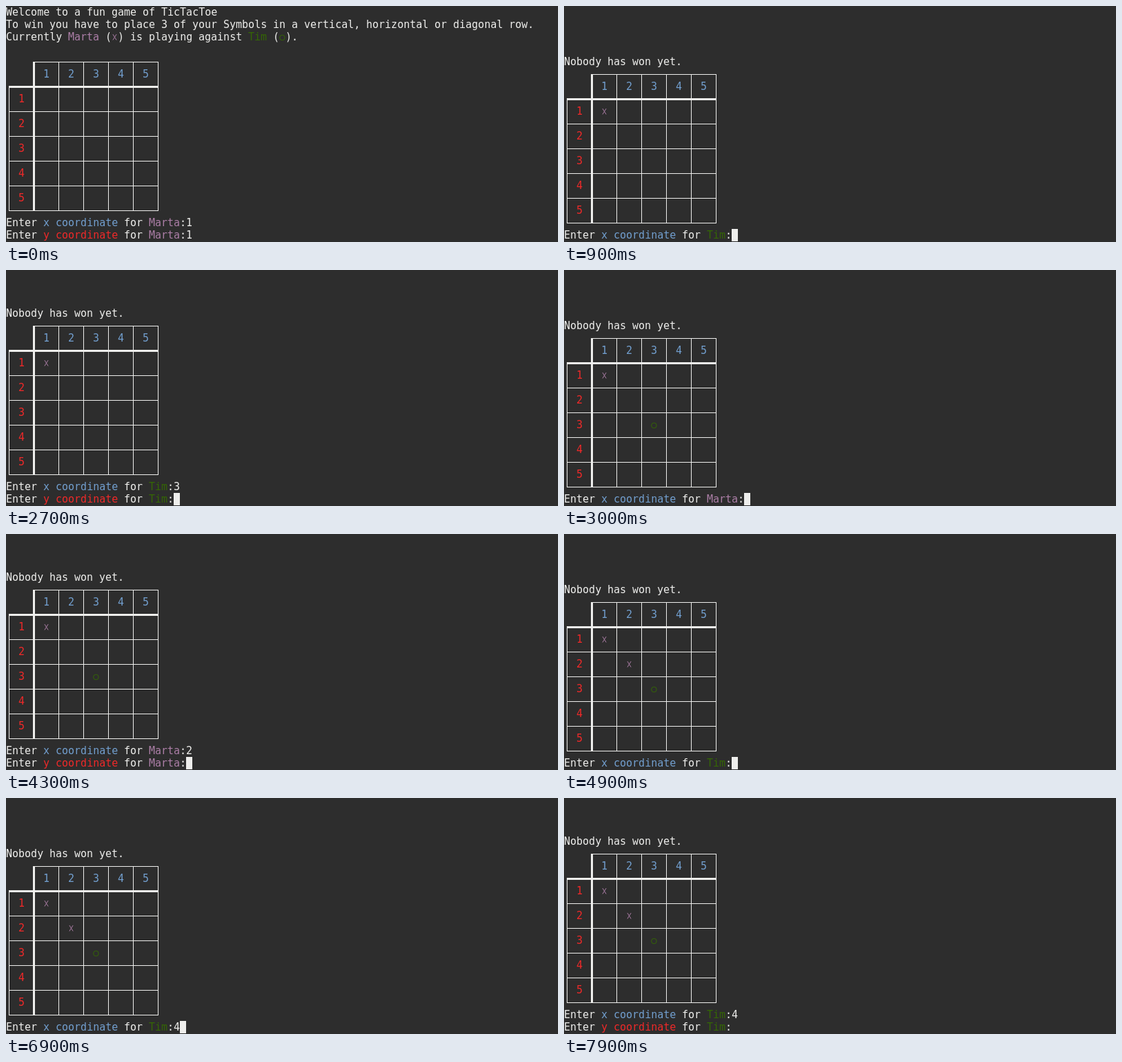
Recreate the animation shown at these times as an HTML page. Size 800x343 px, loop 8 s.

```html
<!DOCTYPE html>
<html lang="en">
<head>
<meta charset="utf-8">
<title>TicTacToe in a terminal</title>
<style>
  html, body { margin: 0; width: 100%; height: 100%; overflow: hidden; background: #2d2d2d; }
  svg { display: block; width: 100%; height: 100%; }
  text { font: 15px "DejaVu Sans Mono", monospace; white-space: pre; }
</style>
</head>
<body>
<svg id="screen" viewBox="0 0 800 343"></svg>
<script>
const CELL = 9, LINE = 18, LOOP = 8000;
const WHITE = '#eeeeec', BLUE = '#729fcf', RED = '#ef2929', PURPLE = '#ad7fa8', GREEN = '#346604';
const cross = { name: 'Marta', color: PURPLE, draw: drawCross };
const ring = { name: 'Tim', color: GREEN, draw: drawRing };
const screen = document.getElementById('screen');

// Moves on the board: player, column, row
const moves = [[cross, 1, 1], [ring, 3, 3], [cross, 2, 2]];

// Start time, moves made, player, typed x, typed y (null = not asked yet), cursor visible
const steps = [
  [0, 0, cross, '1', '1', false],
  [400, 0, cross, '1', '1', true],
  [900, 1, ring, '', null, true],
  [1500, 1, ring, '', null, false],
  [2100, 1, ring, '', null, true],
  [2200, 1, ring, '3', null, true],
  [2700, 1, ring, '3', '', true],
  [2800, 1, ring, '3', '3', true],
  [3000, 2, cross, '', null, true],
  [3600, 2, cross, '', null, false],
  [4000, 2, cross, '2', null, true],
  [4300, 2, cross, '2', '', true],
  [4800, 2, cross, '2', '2', true],
  [4900, 3, ring, '', null, true],
  [5500, 3, ring, '', null, false],
  [6100, 3, ring, '', null, true],
  [6700, 3, ring, '', null, false],
  [6900, 3, ring, '4', null, true],
  [7300, 3, ring, '4', '', true],
  [7900, 3, ring, '4', '', false]
];

function rect(x, y, w, h) {
  return `<rect x="${x}" y="${y}" width="${w}" height="${h}" fill="${WHITE}"/>`;
}

// Every word starts on its own terminal column
function write(col, row, str, color = WHITE) {
  const words = [...str.matchAll(/\S+/g)];
  return words.map(w =>
    `<text x="${(col + w.index) * CELL}" y="${row * LINE + 14}" fill="${color}">${w[0]}</text>`).join('');
}

function writeParts(row, parts) {
  let col = 0, out = '';
  for (const [str, color] of parts) {
    out += write(col, row, str, color);
    col += str.length;
  }
  return out;
}

function drawCross(col, row) {
  const x = col * CELL + 4.5, y = row * LINE + 9.3;
  return `<path d="M${x - 2.6} ${y - 4.2}l5.2 8.4m0 -8.4l-5.2 8.4" stroke="${PURPLE}" fill="none"/>`;
}

function drawRing(col, row) {
  return `<circle cx="${col * CELL + 4.4}" cy="${row * LINE + 10}" r="3.8" stroke="${GREEN}" fill="none"/>`;
}

function drawBoard(row, count) {
  const top = row * LINE + 9;
  let out = rect(40, top, 181, 1) + rect(4, top + 36, 1, 181);
  out += rect(39, top, 3, 217) + rect(4, top + 35, 217, 3);
  for (let i = 1; i <= 5; i++) {
    out += rect(40 + i * 36, top, 1, 217) + rect(4, top + 36 + i * 36, 217, 1);
    out += write(2 + i * 4, row + 1, String(i), BLUE);
    out += write(2, row + 1 + i * 2, String(i), RED);
  }
  for (const [player, x, y] of moves.slice(0, count)) {
    out += player.draw(2 + x * 4, row + 1 + y * 2);
  }
  return out;
}

function drawIntro() {
  return write(0, 0, 'Welcome to a fun game of TicTacToe') +
    write(0, 1, 'To win you have to place 3 of your Symbols in a vertical, horizontal or diagonal row.') +
    writeParts(2, [
      ['Currently '], [cross.name, cross.color], [' ('], [' '], [') is playing against ']
    ]) +
    drawCross(12 + cross.name.length, 2) +
    write(33 + cross.name.length + 1, 2, ring.name, ring.color) +
    write(39 + ring.name.length + 1, 2, '(') +
    drawRing(44, 2) + write(45, 2, ').');
}

function prompt(row, axis, player, typed) {
  return writeParts(row, [
    ['Enter '], [axis + ' coordinate', axis === 'x' ? BLUE : RED],
    [' for '], [player.name, player.color], [':' + typed]
  ]);
}

function render([, count, player, x, y, cursor]) {
  const asksY = y !== null;
  const boardRow = asksY ? 4 : 5;
  let out = count ? write(0, boardRow - 1, 'Nobody has won yet.') : drawIntro();
  out += drawBoard(boardRow, count) + prompt(boardRow + 13, 'x', player, x);
  if (asksY) out += prompt(18, 'y', player, y);
  if (cursor) {
    const col = 24 + player.name.length + (asksY ? y : x).length;
    out += rect(col * CELL, 18 * LINE, CELL, LINE);
  }
  screen.innerHTML = out;
}

let shown = null;
function tick() {
  const t = performance.now() % LOOP;
  const step = steps.findLast(s => s[0] <= t);
  if (step !== shown) render(shown = step);
  requestAnimationFrame(tick);
}
tick();
</script>
</body>
</html>
```
